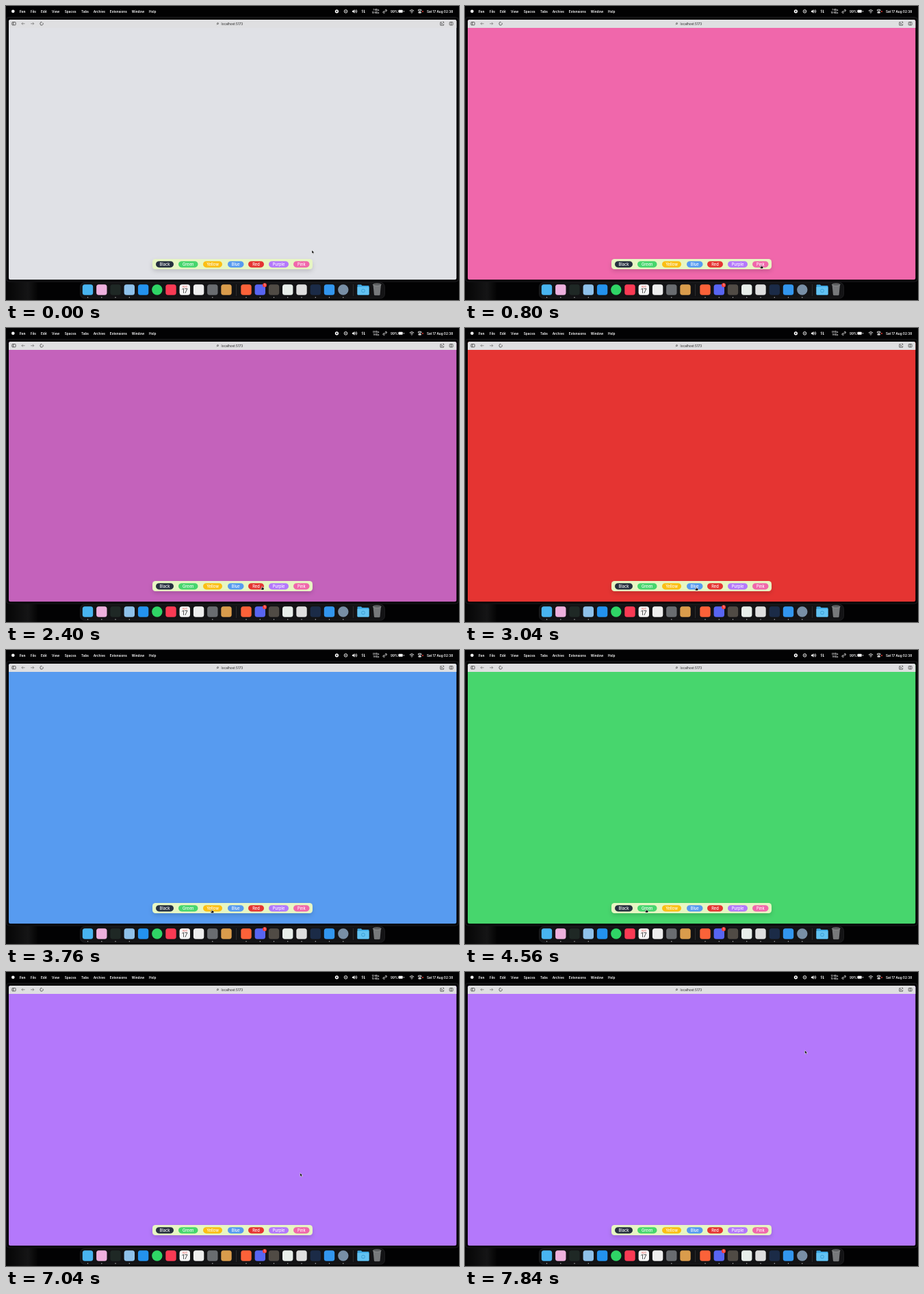
These frames come from a looping animation (662x430 px, 8 s). An HTML page:

```html
<!DOCTYPE html>
<html lang="en">
<head>
<meta charset="utf-8">
<title>Background changer</title>
<style>
html, body { margin: 0; width: 100%; height: 100%; overflow: hidden; background: #000; }
svg { display: block; width: 100%; height: 100%; }
text { font-family: Inter, "Liberation Sans", sans-serif; font-size: 4.7px; }
.menu { fill: #fff; font-weight: 600; }
.line { fill: none; stroke: #fff; stroke-width: .9; }
.tool { fill: none; stroke: #444; stroke-width: .8; }
.label { fill: #fff; font-size: 5.7px; font-weight: 500; text-anchor: middle; }
</style>
</head>
<body>
<svg viewBox="0 0 662 430">
  <defs>
    <linearGradient id="glow">
      <stop offset="0" stop-color="#050505"/><stop offset=".7" stop-color="#151516"/><stop offset="1" stop-color="#040404"/>
    </linearGradient>
    <filter id="shadow" x="-10%" y="-60%" width="120%" height="260%">
      <feDropShadow dx="0" dy="3" stdDeviation="3" flood-opacity=".15"/>
    </filter>
  </defs>
  <rect width="662" height="430" fill="#020203"/>
  <rect y="404" width="46" height="26" fill="url(#glow)"/>
  <rect x=".8" y="16.5" width="660.4" height="386.6" rx="4" fill="#040405" stroke="#29292b" stroke-width=".7"/>

  <g id="menu">
    <circle cx="10.3" cy="7.8" r="2.3" fill="#fff"/>
    <circle cx="483.4" cy="7.8" r="1.8" class="line" style="stroke-width:1.6"/>
    <circle cx="496.5" cy="7.8" r="2.3" class="line"/>
    <circle cx="496.5" cy="7.8" r=".8" fill="#eee"/>
    <path d="M506 6.8h1.4l2-1.8v5.8l-2-1.8H506z" fill="#eee"/>
    <path class="line" d="M510.4 6.3q1 1.5 0 3M511.8 5.3q2 2.5 0 5M521 10V5.7l-1 1M523.5 5.7V10l1-1"/>
    <path class="line" d="M552.7 8.7l2-2M552.4 7.2l-1 1q-.8 1.4.3 2 1 .5 2-.6M554.2 5.9q1.2-1 2-.1.7.9-1 2.5"/>
    <rect x="573.4" y="5.8" width="6.4" height="4" rx="1" fill="#fff"/>
    <path d="M581.5 7v1.6" class="line"/>
    <path class="line" d="M589.8 7q3.2-2.8 6.4 0M591.2 8.5q1.8-1.4 3.6 0"/>
    <circle cx="593" cy="9.9" r=".7" fill="#eee"/>
    <rect x="602.4" y="5.2" width="4.6" height="2" rx="1" class="line"/>
    <rect x="602.4" y="8.5" width="4.6" height="2" rx="1" fill="#eee"/>
    <circle cx="609" cy="8" r="1" fill="#e33b35"/>
    <text class="menu" id="netUp" x="545.5" y="7.2" text-anchor="end" style="font-size:3px"></text>
    <text class="menu" id="netDown" x="545.5" y="10.7" text-anchor="end" style="font-size:3px"></text>
  </g>

  <rect id="page" x="4" y="20" width="654.3" height="380.3" rx="2.5"/>
  <path d="M4 32V22.5q0-2.5 2.5-2.5h649.3q2.5 0 2.5 2.5V32z" fill="#dfdfe1"/>
  <g class="tool">
    <rect x="8.8" y="23.6" width="5.3" height="4.3" rx=".7"/>
    <path d="M10.7 23.6v4.3"/>
    <path d="M27.5 25.8h-4.6l1.7-1.7m-1.7 1.7l1.7 1.7M36.2 25.8h4.6l-1.7-1.7m1.7 1.7l-1.7 1.7" stroke="#777"/>
    <path d="M53.8 24.6a2.2 2.2 0 1 1-1.7-.9l-.8-.9"/>
    <path d="M637 23.8h-2.2v4.4h4.8v-2M636.4 26h1.6M637.2 25.2v1.6M638 23.3h1.7V25"/>
    <rect x="648.2" y="23.6" width="4.8" height="4.4" rx=".6"/>
    <path d="M650.6 23.6V28"/>
    <circle cx="309.5" cy="25.6" r="1"/>
    <path d="M308.8 26.4l-.8.9"/>
  </g>
  <text x="314.6" y="27.6" fill="#222">localhost:5173</text>

  <rect x="214" y="370" width="234" height="15" rx="4.5" fill="#e7f6c3" filter="url(#shadow)"/>
  <g id="buttons"></g>

  <rect x="108.5" y="404.5" width="445" height="23" rx="6" fill="#131315" stroke="#2a2a2c" stroke-width=".6"/>
  <path d="M336.6 407v17M507.4 407v17" stroke="#444" stroke-width=".6"/>
  <g id="dock"></g>
  <path d="M513.5 408.5q0-1 1-1h4.5l1.5 1.5h9q1 0 1 1v11.5q0 1-1 1h-15q-1 0-1-1z" fill="#3fa9e4"/>
  <path d="M513.5 411h17v10.5q0 1-1 1h-15q-1 0-1-1z" fill="#63c3f3"/>
  <circle cx="522" cy="416.5" r="2.4" fill="none" stroke="#3c9fd6"/>
  <path d="M536.5 407.5h11.5l-1.4 14.5q-.2 1.2-1.2 1.2h-6.3q-1 0-1.2-1.2z" fill="#77797b"/>
  <ellipse cx="542.2" cy="407.6" rx="5.9" ry="1.6" fill="#55585a" stroke="#aaa" stroke-width=".6"/>

  <g id="cursor" stroke="#fff" stroke-width=".5" stroke-linejoin="round">
    <path id="arrow" d="M0 0v5l1.2-1 .8 1.8 1-.5-.8-1.6h1.5z" fill="#000"/>
    <path id="hand" d="M-.6 0q.6-.6 1.1 0v1.7l1.8.5q.7.2.5 1L2.3 5h-3.2L-2.4 3q.3-.8 1.1-.2l.7.5z" fill="#000"/>
  </g>
</svg>
<script>
const DURATION = 8000, FADE = 200;
const $ = id => document.getElementById(id);
const add = (id, markup) => $(id).insertAdjacentHTML("beforeend", markup);

const colors = {
  gray: [224, 225, 230], black: [45, 55, 72], green: [71, 214, 109], yellow: [251, 191, 20],
  blue: [87, 155, 240], red: [229, 52, 50], purple: [180, 120, 251], pink: [240, 103, 171]
};
const rgb = c => `rgb(${c.map(Math.round)})`;

const menuItems = [["Fen", 20], ["File", 36], ["Edit", 51], ["View", 67], ["Spaces", 85.7], ["Tabs", 110],
  ["Archive", 127.7], ["Extensions", 151.8], ["Window", 183.7], ["Help", 209], ["99%", 562], ["Sat 17 Aug 02:38", 615]];
menuItems.forEach(([label, x], i) =>
  add("menu", `<text class="menu" x="${x}" y="9.6"${i ? "" : ' style="font-weight:700"'}>${label}</text>`));

const buttons = [["Black", 219, 26], ["Green", 252, 28.5], ["Yellow", 288, 28], ["Blue", 324, 23.5],
  ["Red", 354, 23], ["Purple", 384, 29], ["Pink", 420, 23.5]];
for (const [label, x, w] of buttons) {
  const fill = label === "Black" ? "#26303f" : rgb(colors[label.toLowerCase()]);
  add("buttons", `<rect x="${x}" y="373.2" width="${w}" height="9.2" rx="4.6" fill="${fill}"/>
    <text class="label" x="${x + w / 2}" y="379.9">${label}</text>`);
}

// Dock tiles: centre, colour, running, round
const tiles = [[119.5, "#48b4f0", 1], [139.8, "#eeb0dd", 1], [160, "#1f2825", 1], [180.3, "#8fc1ea", 1],
  [200.6, "#2392ee"], [220.8, "#2fd566", 0, 1], [241, "#f93a54"], [261.3, "#f6f6f6"], [281.6, "#eeeeee"],
  [301.8, "#696c70", 1], [322, "#d99c4c"], [351, "#fb6239", 1], [371.3, "#5865f2", 1], [391.5, "#504b45", 1],
  [411.7, "#e8eeea", 1], [432, "#dedede", 1], [452.3, "#1b2b47", 1], [472.5, "#3296ee", 1], [492.8, "#788fa6", 1, 1]];
for (const [x, fill, running, round] of tiles) {
  add("dock", `<rect x="${x - 7.7}" y="407.3" width="15.4" height="15.4" rx="${round ? 7.7 : 3.5}" fill="${fill}"/>`);
  if (running) add("dock", `<circle cx="${x}" cy="426.2" r=".7" fill="#bbb"/>`);
}
add("dock", `<text x="261.3" y="411.7" text-anchor="middle" fill="#e43d38" style="font-size:3.3px">AUG</text>
  <text x="261.3" y="420" text-anchor="middle" fill="#333" style="font-size:9px">17</text>
  <circle cx="378" cy="408.3" r="3" fill="#f43b35"/>
  <text x="378" y="410" text-anchor="middle" fill="#fff">1</text>`);

const fades = [[580, "pink"], [1630, "purple"], [2359, "red"], [3040, "blue"], [3790, "yellow"],
  [4370, "green"], [5060, "black"], [6430, "purple"]];

// Cursor tip: time, x, y
const path = [[0, 447, 357], [80, 447, 357], [500, 433, 379], [1180, 433, 379], [1520, 399.5, 379.7],
  [1860, 399.5, 379.7], [2160, 374.3, 378], [2560, 374.3, 378], [2920, 338, 379], [3300, 338, 379],
  [3680, 301, 379.7], [4000, 301, 379.7], [4320, 265, 379], [4600, 265, 379], [4960, 232, 379],
  [5650, 232, 379], [6160, 346, 379], [6320, 398, 379], [6700, 398, 379], [7600, 496.6, 114.6], [8000, 496.6, 114.6]];

const mix = (a, b, p) => a + (b - a) * p;

// CSS "ease": cubic-bezier(.25, .1, .25, 1)
function ease(x) {
  const curve = (a, b, s) => 3 * a * s * (1 - s) ** 2 + 3 * b * s * s * (1 - s) + s ** 3;
  let low = 0, high = 1;
  for (let i = 0; i < 14; i++) {
    const s = (low + high) / 2;
    if (curve(.25, .25, s) < x) low = s; else high = s;
  }
  return curve(.1, 1, low);
}

function pageColor(t) {
  let color = colors.gray;
  for (const [start, name] of fades) {
    if (t < start) break;
    const p = t >= start + FADE ? 1 : ease((t - start) / FADE);
    color = color.map((v, i) => mix(v, colors[name][i], p));
  }
  return rgb(color);
}

function cursorAt(t) {
  const i = path.findIndex(k => k[0] > t);
  const [t0, x0, y0] = path[i - 1], [t1, x1, y1] = path[i];
  const p = (t - t0) / (t1 - t0), s = p * p * (3 - 2 * p);
  return [mix(x0, x1, s), mix(y0, y1, s)];
}

// Network meter: start time, upload, download
const traffic = [[0, "7 KB/s", "10 KB/s"], [1200, "3 KB/s", "2 KB/s"], [2320, "4 KB/s", "1 KB/s"],
  [5120, "7 KB/s", "10 KB/s"], [6900, "12 KB/s", "15 KB/s"]];

function draw() {
  const t = performance.now() % DURATION;
  $("page").setAttribute("fill", pageColor(t));
  const [x, y] = cursorAt(t);
  const hover = y > 373 && y < 382.4 && buttons.some(([, left, w]) => x > left && x < left + w);
  $("cursor").setAttribute("transform", `translate(${x} ${y})`);
  $("arrow").style.display = hover ? "none" : "";
  $("hand").style.display = hover ? "" : "none";
  const [, up, down] = traffic.findLast(([start]) => start <= t);
  $("netUp").textContent = up;
  $("netDown").textContent = down;
  requestAnimationFrame(draw);
}
draw();
</script>
</body>
</html>
```
